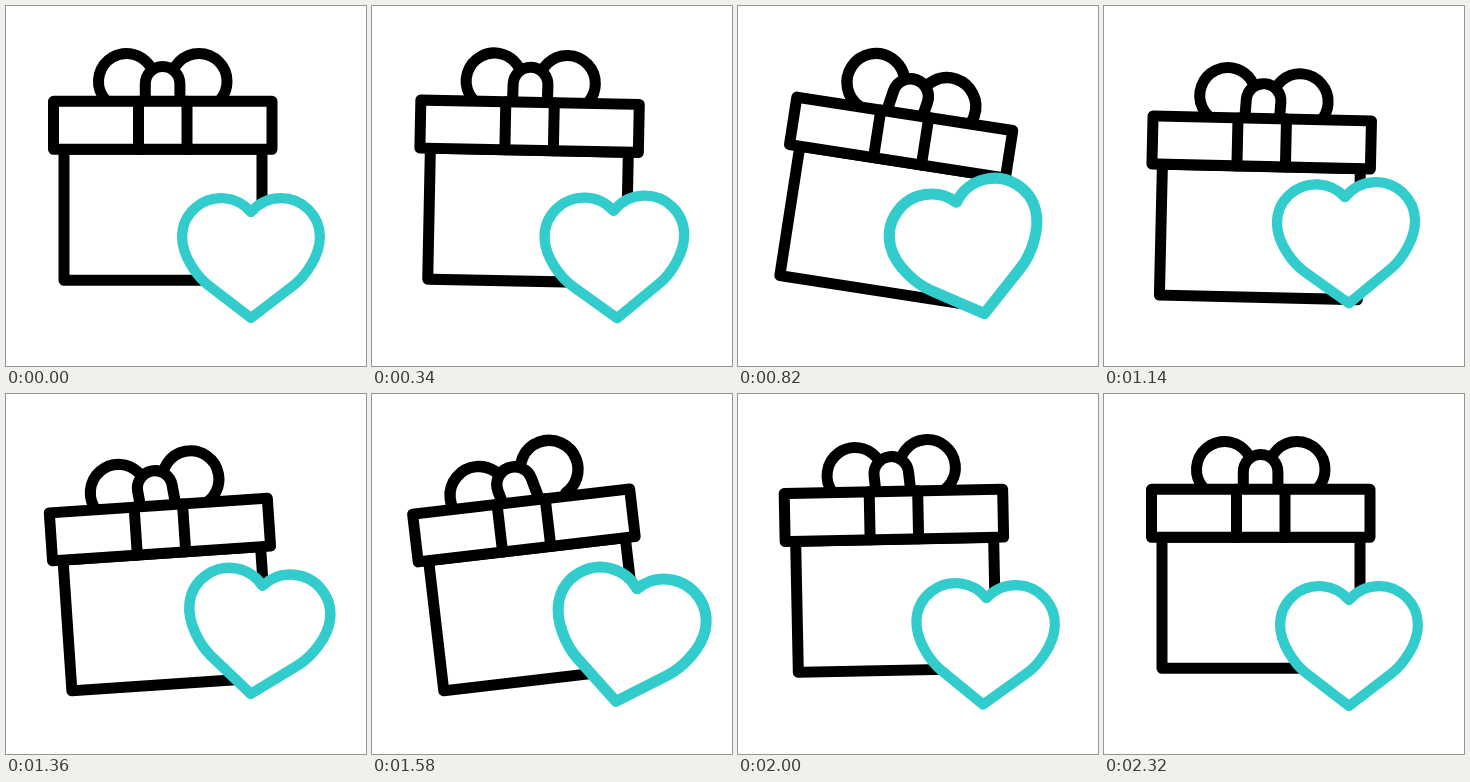
An HTML page with a canvas for the animation above (2400 ms loop, 360x360 px).

```html
<!DOCTYPE html>
<html lang="en">
<head>
<meta charset="utf-8">
<title>Gift with heart</title>
<style>
html, body { margin: 0; width: 100%; height: 100%; overflow: hidden; background: #fff; }
canvas { display: block; width: 360px; height: 360px; }
</style>
</head>
<body>
<canvas id="stage"></canvas>
<script>
const LOOP = 2400;
const RAD = Math.PI / 180;
const canvas = document.getElementById('stage');
const ctx = canvas.getContext('2d');
const dpr = window.devicePixelRatio || 1;
canvas.width = canvas.height = 360 * dpr;

// Keys are [time, value, slope]; slope defaults to 0 (eased).
const tilt = [[210, 0], [790, 8.9], [1140, 1.35, -0.027], [1640, -6.8], [2130, 0]];
const bowTilt = [[230, 0], [880, 10.2], [1640, -14.2], [2250, 0]];
const shift = [[200, 0], [1200, 1], [2220, 0]];
const swell = [[220, 0], [730, 0.095], [1180, 0], [1700, 0.095], [2050, 0]];

function valueAt(keys, t) {
  if (t <= keys[0][0]) return keys[0][1];
  for (let i = 1; i < keys.length; i++) {
    const [t0, a, m0 = 0] = keys[i - 1];
    const [t1, b, m1 = 0] = keys[i];
    if (t > t1) continue;
    const d = t1 - t0;
    const u = (t - t0) / d;
    const ease = u * u * (3 - 2 * u);
    return a + (b - a) * ease
      + u * (1 - u) * (1 - u) * d * m0
      - u * u * (1 - u) * d * m1;
  }
  return keys[keys.length - 1][1];
}

function paint(path) {
  ctx.fill(path);
  ctx.stroke(path);
}

function shape(build) {
  const p = new Path2D();
  build(p);
  return p;
}

// Turns and scales the drawing around a point.
function pivot(x, y, angle, scale = 1) {
  ctx.translate(x, y);
  ctx.rotate(angle);
  ctx.scale(scale, scale);
  ctx.translate(-x, -y);
}

const bows = [
  shape(p => p.arc(120.5, 75.5, 28, 105 * RAD, 360 * RAD)),
  shape(p => p.arc(193, 75.5, 28, 180 * RAD, 435 * RAD))
];
const knot = shape(p => {
  p.moveTo(139.3, 95.3);
  p.lineTo(139.3, 77.8);
  p.arc(156.6, 77.8, 17.3, Math.PI, 0);
  p.lineTo(173.9, 95.3);
});
const box = shape(p => p.rect(58, 143.3, 198, 131));
const lid = shape(p => p.rect(47.5, 95.3, 218.5, 48));
const ribbon = shape(p => {
  for (const x of [132.5, 181]) {
    p.moveTo(x, 95.3);
    p.lineTo(x, 143.3);
  }
});

// Heart coordinates are relative to its tip.
const heart = shape(p => {
  const notch = Math.atan2(-25, 30);
  p.arc(-30, -81, 38.9, notch, -Math.PI, true);
  p.bezierCurveTo(-68.9, -62, -54, -41.5, -43, -33);
  p.lineTo(0, 0);
  p.lineTo(43, -33);
  p.bezierCurveTo(54, -41.5, 68.9, -62, 68.9, -81);
  p.arc(30, -81, 38.9, 0, -Math.PI - notch, true);
  p.closePath();
});

function drawGift(angle, bowAngle, bowScale, dy) {
  ctx.save();
  ctx.strokeStyle = '#000';
  ctx.lineWidth = 11;
  ctx.translate(0, dy);
  pivot(156.5, 161, angle);
  ctx.save();
  pivot(156.6, 95.3, bowAngle, bowScale);
  bows.forEach(paint);
  paint(knot);
  ctx.restore();
  paint(box);
  paint(lid);
  ctx.stroke(ribbon);
  ctx.restore();
}

function drawHeart(angle, scale, dy) {
  ctx.save();
  ctx.strokeStyle = '#33cccc';
  ctx.lineWidth = 10.2;
  ctx.translate(245, 312 + dy);
  ctx.rotate(angle);
  pivot(0, -70, 0, scale);
  paint(heart);
  ctx.restore();
}

function draw(t) {
  const angle = valueAt(tilt, t) * RAD;
  const bowAngle = valueAt(bowTilt, t) * RAD;
  const move = valueAt(shift, t);
  const grow = valueAt(swell, t);
  ctx.setTransform(dpr, 0, 0, dpr, 0, 0);
  ctx.fillStyle = '#fff';
  ctx.fillRect(0, 0, 360, 360);
  ctx.lineJoin = ctx.lineCap = 'round';
  drawGift(angle, bowAngle, 1 + 0.4 * grow, 17.3 * move);
  drawHeart(-1.6 * angle, 1 + grow, -15 * move);
}

const start = performance.now();
function tick() {
  draw((performance.now() - start) % LOOP);
  requestAnimationFrame(tick);
}
tick();
</script>
</body>
</html>
```
